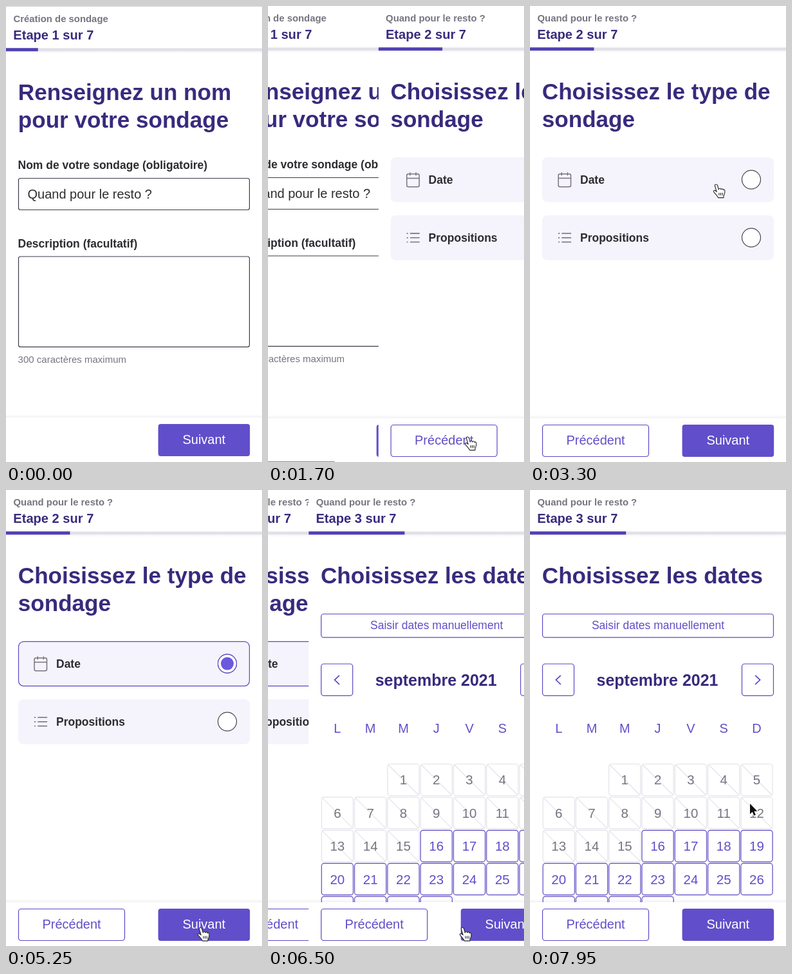
These frames come from a looping animation (398 by 708 pixels, 8000 ms). An HTML page with a canvas:

```html
<!DOCTYPE html>
<html lang="fr">
<head>
<meta charset="utf-8">
<title>Sondage</title>
<style>
  html, body { margin: 0; width: 100%; height: 100%; overflow: hidden; background: #fff; }
  canvas { display: block; }
</style>
</head>
<body>
<canvas id="stage" width="398" height="708"></canvas>
<script>
const W = 398, H = 708, LOOP = 8000;
const ctx = document.getElementById('stage').getContext('2d');
const FONT = '"Liberation Sans", Arial, sans-serif';
const C = {
  title: '#392a7d', main: '#614eca', line: '#5c49c4', bar: '#5040b4', track: '#e2e0e9',
  dark: '#2d2c31', field: '#3d3b4a', grey: '#777480', pale: '#e3e1e9', card: '#f5f3fb'
};
const SLIDE_1 = 1609, SLIDE_2 = 6342;

const clamp = v => Math.max(0, Math.min(1, v));
const smooth = p => p * p * (3 - 2 * p);

function text(str, x, y, size, color, bold, align) {
  ctx.font = (bold ? 'bold ' : '') + size + 'px ' + FONT;
  ctx.fillStyle = color;
  ctx.textAlign = align || 'left';
  ctx.fillText(str, x, y);
}

function box(x, y, w, h, r, fill, stroke, lw = 1.2) {
  ctx.beginPath();
  ctx.roundRect(x, y, w, h, r);
  if (fill) { ctx.fillStyle = fill; ctx.fill(); }
  if (stroke) { ctx.strokeStyle = stroke; ctx.lineWidth = lw; ctx.stroke(); }
}

function path(points, color, lw) {
  ctx.beginPath();
  points.forEach(([x, y]) => ctx.lineTo(x, y));
  ctx.strokeStyle = color;
  ctx.lineWidth = lw;
  ctx.stroke();
}

function fade(y, h, from, to) {
  const g = ctx.createLinearGradient(0, y, 0, y + h);
  g.addColorStop(0, `rgba(70,60,110,${from})`);
  g.addColorStop(1, `rgba(70,60,110,${to})`);
  ctx.fillStyle = g;
  ctx.fillRect(0, y, W, h);
}

function header(name, step) {
  ctx.fillStyle = '#fff';
  ctx.fillRect(0, -2, W, 67);
  text(name, 11.5, 24, 14.9, C.grey, true);
  text(`Etape ${step} sur 7`, 11.3, 50.5, 20.1, C.title, true);
  ctx.fillStyle = C.track;
  ctx.fillRect(0, 64.5, W, 4.7);
  ctx.fillStyle = C.bar;
  ctx.fillRect(0, 64.3, W / 8 * step, 5);
  fade(69.3, 4, 0.05, 0);
}

function footer(back) {
  fade(635, 5, 0, 0.07);
  ctx.fillStyle = '#fff';
  ctx.fillRect(0, 640, W, 70);
  if (back) {
    box(19.5, 650.5, 165, 49, 4, '#fff', C.line);
    text('Précédent', 102, 681.3, 20, C.main, false, 'center');
  }
  box(236.6, 650, 142.6, 50, 4, C.main);
  text('Suivant', 307.8, 681.3, 20, '#fff', false, 'center');
}

function namePage(t) {
  const dy = t < 1600 ? 1 : 0;
  ctx.save();
  ctx.translate(0, dy);
  header('Création de sondage', 1);
  text('Renseignez un nom', 18.8, 145, 35.1, C.title, true);
  text('pour votre sondage', 18.8, 188, 35.1, C.title, true);
  text('Nom de votre sondage (obligatoire)', 18.5, 252, 17.5, C.dark, true);
  box(19.5, 266.5, 359, 49, 3, null, C.field);
  text('Quand pour le resto ?', 33.5, 298.3, 20, C.dark);
  text('Description (facultatif)', 18.5, 373.5, 17.5, C.dark, true);
  box(19.5, 388, 359, 140.3, 3, null, C.field);
  text('300 caractères maximum', 18.6, 552.5, 15, C.grey);
  ctx.translate(0, -2 * dy);
  footer(false);
  ctx.restore();
  if (dy) {
    ctx.fillStyle = '#d2d1d6';
    ctx.fillRect(0, 0, W, 1);
  }
}

function calendarIcon(x, y) {
  box(x - 9.7, y - 9, 19.4, 20, 2.5, null, C.grey, 1.5);
  path([[x - 9.7, y - 2.4], [x + 9.7, y - 2.4]], C.grey, 1.5);
  for (const d of [-4.6, 4.6]) path([[x + d, y - 11.5], [x + d, y - 6.6]], C.grey, 1.5);
}

function listIcon(x, y) {
  for (const d of [-6.7, 0, 6.7]) {
    path([[x - 9.8, y + d], [x - 7.8, y + d]], C.grey, 1.7);
    path([[x - 4.5, y + d], [x + 10.3, y + d]], C.grey, 1.6);
  }
}

function choice(y, label, icon, on) {
  box(19, y, 360, 69.5, 8, C.card);
  icon(53.8, y + 34.8);
  text(label, 78, y + 40.7, 17.5, C.dark, true);
  const ring = (r, fill, stroke) => {
    ctx.beginPath();
    ctx.arc(344, y + 34.6, r, 0, 7);
    if (fill) { ctx.fillStyle = fill; ctx.fill(); }
    if (stroke) { ctx.strokeStyle = stroke; ctx.lineWidth = 1.2; ctx.stroke(); }
  };
  ring(14.5, '#fff', '#4a4852');
  if (on > 0) {
    ctx.save();
    ctx.globalAlpha = on;
    box(19.5, y + 0.3, 359, 69, 8, null, C.line);
    ring(14.5, '#fff', C.line);
    ring(10, '#6b58dd');
    ctx.restore();
  }
}

function typePage(t) {
  header('Quand pour le resto ?', 2);
  text('Choisissez le type de', 18.8, 145, 35.1, C.title, true);
  text('sondage', 18.8, 188, 35.1, C.title, true);
  choice(235, 'Date', calendarIcon, clamp((t - 3300) / 180));
  choice(325, 'Propositions', listIcon, 0);
  footer(true);
}

function dayCell(day) {
  const slot = day + 1;
  const x = 44.7 + slot % 7 * 51.3, y = 450 + Math.floor(slot / 7) * 51.4;
  const past = day <= 15;
  box(x - 24.6, y - 24.5, 49.2, 49, 4, '#fff', past ? C.pale : C.line);
  if (past) path([[x - 24, y - 24], [x + 24, y + 24]], C.pale, 1.1);
  text(day, x, y + 7.4, 20.5, past ? C.grey : C.main, false, 'center');
}

function datePage() {
  header('Quand pour le resto ?', 3);
  text('Choisissez les dates', 18.8, 145, 35.1, C.title, true);
  box(19.5, 192.5, 359, 36.4, 4, null, C.line);
  text('Saisir dates manuellement', 199, 216, 17.5, C.main, false, 'center');
  for (const [x, d] of [[44, -1], [354, 1]]) {
    box(x - 24.5, 270, 49, 49.3, 4, null, C.line);
    path([[x - 3.8 * d, 287.8], [x + 3.6 * d, 294.8], [x - 3.8 * d, 301.8]], C.line, 1.7);
  }
  text('septembre 2021', 198, 303.5, 25, C.title, true, 'center');
  [...'LMMJVSD'].forEach((c, i) => text(c, 44.7 + i * 51.3, 377.2, 20, C.main, false, 'center'));
  for (let day = 1; day <= 30; day++) dayCell(day);
  footer(true);
}

// Critically damped spring: share of the way still to go
function remaining(t, start) {
  const k = Math.max(0, t - start) * 0.02075;
  return (1 + k) * Math.exp(-k);
}

function pageAt(x, draw, t) {
  ctx.save();
  ctx.translate(x, 0);
  ctx.beginPath();
  ctx.rect(0, 0, W, H);
  ctx.clip();
  ctx.fillStyle = '#fff';
  ctx.fillRect(0, 0, W, H);
  draw(t);
  ctx.restore();
}

function push(from, to, t, start) {
  const left = W * remaining(t, start), shift = -0.3 * (W - left);
  if (left > 0.3) pageAt(shift, from, t);
  if (start === SLIDE_1 && t >= start) {
    ctx.fillStyle = '#8a8892';
    ctx.fillRect(0, 707, Math.max(0, left + shift), 1);
  }
  if (left < W) pageAt(left < 0.3 ? 0 : left, to, t);
}

// Pointer strokes: start, end, then from, control and to points
const MOVES = [
  [300, 800, 402, 169, 178, 420, 310, 669],
  [2450, 3150, 310, 669, 300, 470, 289, 277],
  [4500, 5100, 289, 277, 298, 480, 304, 674],
  [5200, 5250, 304, 674, 303, 677, 302, 679.5],
  [7050, 7150, 302, 679.5, 308, 630, 310, 585],
  [7700, 7950, 310, 585, 322, 530, 342, 487]
];

function pointerAt(t) {
  const m = MOVES.filter(v => t >= v[0]).pop();
  if (!m) return null;
  const p = smooth(clamp((t - m[0]) / (m[1] - m[0]))), q = 1 - p;
  const along = i => q * q * m[i] + 2 * p * q * m[i + 2] + p * p * m[i + 4];
  return [along(2), along(3)];
}

function clickable(x, y, t) {
  if (x < 237 || x > 379) return false;
  if (y > 649 && y < 701) return true;
  if (t < SLIDE_1) return false;
  if (t < SLIDE_2) return y > 235 && y < 395 && !(y > 304 && y < 325);
  return y > 528 && y < 630;
}

const ARROW = new Path2D('M0 0V16.2L3.7 12.8L6.3 18.6L8.9 17.4L6.4 11.8H11.4Z');
const HAND = new Path2D('M-1.7 2C-2 -.2 1.5 -1 2.5 1.5L4.4 8C4.4 5.8 7.4 5.5 8 8C8.4 6.2 10.8 6.3 11.3 8.6' +
  'C12 7.2 13.8 7.8 13.9 10C14.3 14 13 15.5 12 18V20.6H3.6C2 17 -1 14.6 -3.4 11.6C-4.4 9.6 -2 8.6 -.2 10.2L1.2 11.5Z');
const FOLDS = new Path2D('M5 13V17M7.6 13V17M10.2 13V17');

function pointer(t) {
  const at = pointerAt(t);
  if (!at) return;
  const hand = clickable(at[0], at[1], t);
  ctx.save();
  ctx.translate(at[0], at[1]);
  ctx.lineJoin = 'round';
  if (hand) {
    ctx.fillStyle = '#fff';
    ctx.fill(HAND);
    ctx.strokeStyle = '#26252b';
    ctx.lineWidth = 1.1;
    ctx.stroke(HAND);
    ctx.stroke(FOLDS);
  } else {
    ctx.strokeStyle = '#fff';
    ctx.lineWidth = 2.2;
    ctx.stroke(ARROW);
    ctx.fillStyle = '#111';
    ctx.fill(ARROW);
  }
  ctx.restore();
}

function draw(t) {
  ctx.fillStyle = '#fff';
  ctx.fillRect(0, 0, W, H);
  if (t < SLIDE_2) push(namePage, typePage, t, SLIDE_1);
  else push(typePage, datePage, t, SLIDE_2);
  pointer(t);
}

const begin = performance.now();
function frame() {
  draw((performance.now() - begin) % LOOP);
  requestAnimationFrame(frame);
}
frame();
</script>
</body>
</html>
```
